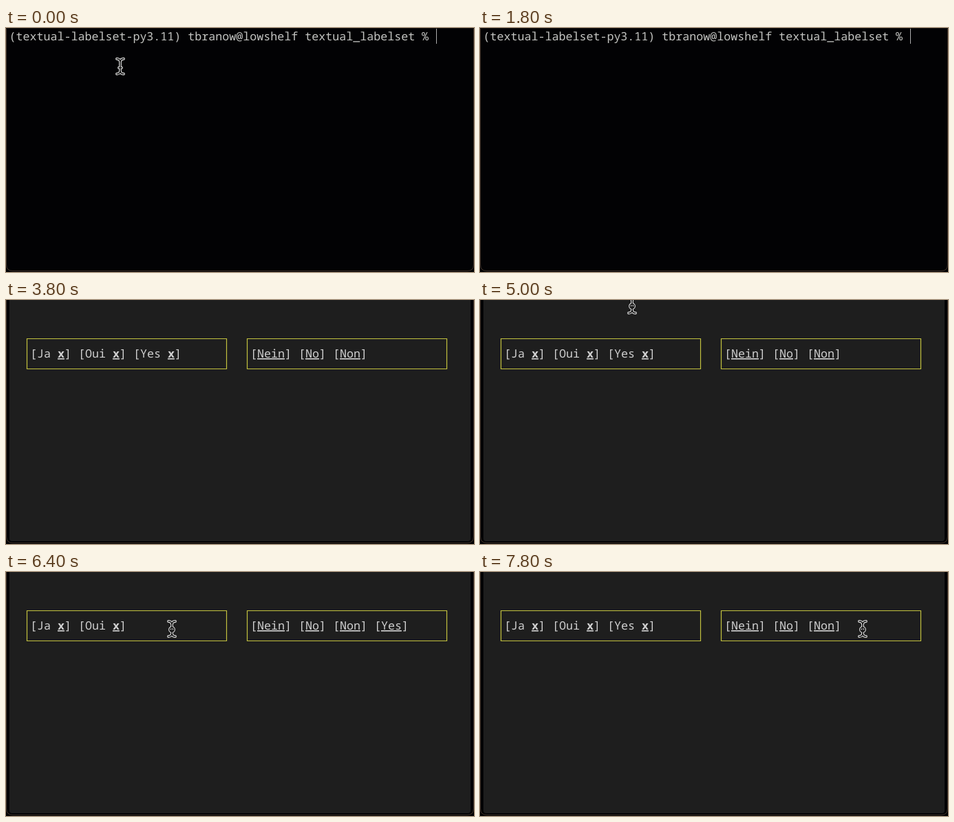
An HTML page for the animation above (8 s loop, 680 px wide and 356 px high).

```html
<!DOCTYPE html>
<html lang="en">
<head>
<meta charset="utf-8">
<title>Label set demo</title>
<style>
  html, body { margin: 0; width: 100%; height: 100%; overflow: hidden; background: #000; }
  svg { display: block; width: 680px; height: 356px; }
  text {
    font: 16.667px "Noto Sans Mono", "DejaVu Sans Mono", monospace;
    fill: #d0d0d0; white-space: pre; text-rendering: geometricPrecision;
  }
  #shell text { fill: #c4c5c2; }
  .link { text-decoration: underline; text-decoration-thickness: 1px; text-underline-offset: 3px; }
  .close { font-weight: bold; }
  #pointer { fill: none; stroke-linecap: round; stroke-linejoin: round; }
</style>
</head>
<body>
<svg viewBox="0 0 680 356">
  <defs>
    <g id="beam">
      <path d="M-5-11Q0-11 0-6Q0-11 5-11M0-6V6M-5 11Q0 11 0 6Q0 11 5 11M-2 2H2"/>
      <circle class="ring" cy="1" r="3"/>
    </g>
  </defs>
  <rect width="680" height="356" fill="#020204"/>
  <path d="M.5 0V345Q.5 354.5 10 354.5H670Q679.5 354.5 679.5 345V0" fill="none" stroke="#42342a"/>

  <g id="shell">
    <path d="M0 .5H680" stroke="#14110f"/>
    <text x="4.5" y="18">(textual-labelset-py3.11) tbranow@lowshelf textual_labelset % <tspan class="command">pytho</tspan></text>
    <text x="4.5" y="40" class="command">n src/textual_labelset/demo.py</text>
    <rect id="caret" width="1" height="22" fill="#adadad"/>
  </g>

  <g id="app">
    <path d="M5 0H675V348Q675 352 671 352H9Q5 352 5 348Z" fill="#1e1e1e"/>
    <path d="M30.5 56.5h290v44h-290zM350.5 56.5h290v44h-290z" fill="none" stroke="#c3c23f" stroke-width="1.2"/>
    <text id="chosen" x="35" y="84"></text>
    <text id="offered" x="355" y="84"></text>
  </g>

  <g id="pointer">
    <use href="#beam" stroke="#e0e0e0" stroke-width="3.8"/>
    <use href="#beam" stroke="#101010" stroke-width="1.5"/>
  </g>
</svg>
<script>
const LOOP = 8000, STEP = 200;
const $ = id => document.getElementById(id);
const show = (el, on) => { el.style.display = on ? "" : "none"; };
const commands = document.querySelectorAll(".command");
const ring = document.querySelector(".ring");

// Pointer legs: start, end, from, to
const legs = [
  [0, 1200, [166, 56], [161, -1]],
  [5000, 6200, [221, 8], [241, 83]],
  [6400, 7600, [241, 83], [556, 83]]
];

const chosenLabel = name => `[${name} <tspan class="link close">x</tspan>]`;
const offeredLabel = name => `[<tspan class="link">${name}</tspan>]`;

function pointerAt(t) {
  const [start, end, from, to] = legs.findLast(leg => t >= leg[0]);
  const p = Math.min(1, (t - start) / (end - start));
  const eased = p * p * (3 - 2 * p);
  return from.map((v, i) => v + (to[i] - v) * eased);
}

let yesMoved;
function setLabels(moved) {
  if (moved === yesMoved) return;
  yesMoved = moved;
  const chosen = ["Ja", "Oui"], offered = ["Nein", "No", "Non"];
  (moved ? offered : chosen).push("Yes");
  $("chosen").innerHTML = chosen.map(chosenLabel).join(" ");
  $("offered").innerHTML = offered.map(offeredLabel).join(" ");
}

function draw(now) {
  const t = Math.floor(now % LOOP / STEP) * STEP;
  const running = t >= 3800, entered = t >= 3000;
  show($("shell"), !running);
  show($("app"), running);
  commands.forEach(el => show(el, entered));
  $("caret").setAttribute("x", entered ? 5 : 625);
  $("caret").setAttribute("y", entered ? 45 : 1);
  setLabels(t >= 6400 && t < 7800);

  show($("pointer"), t < 1400 || t >= 5000);
  show(ring, running);
  $("pointer").setAttribute("transform", `translate(${pointerAt(t)})`);
  requestAnimationFrame(draw);
}
requestAnimationFrame(draw);
</script>
</body>
</html>
```
